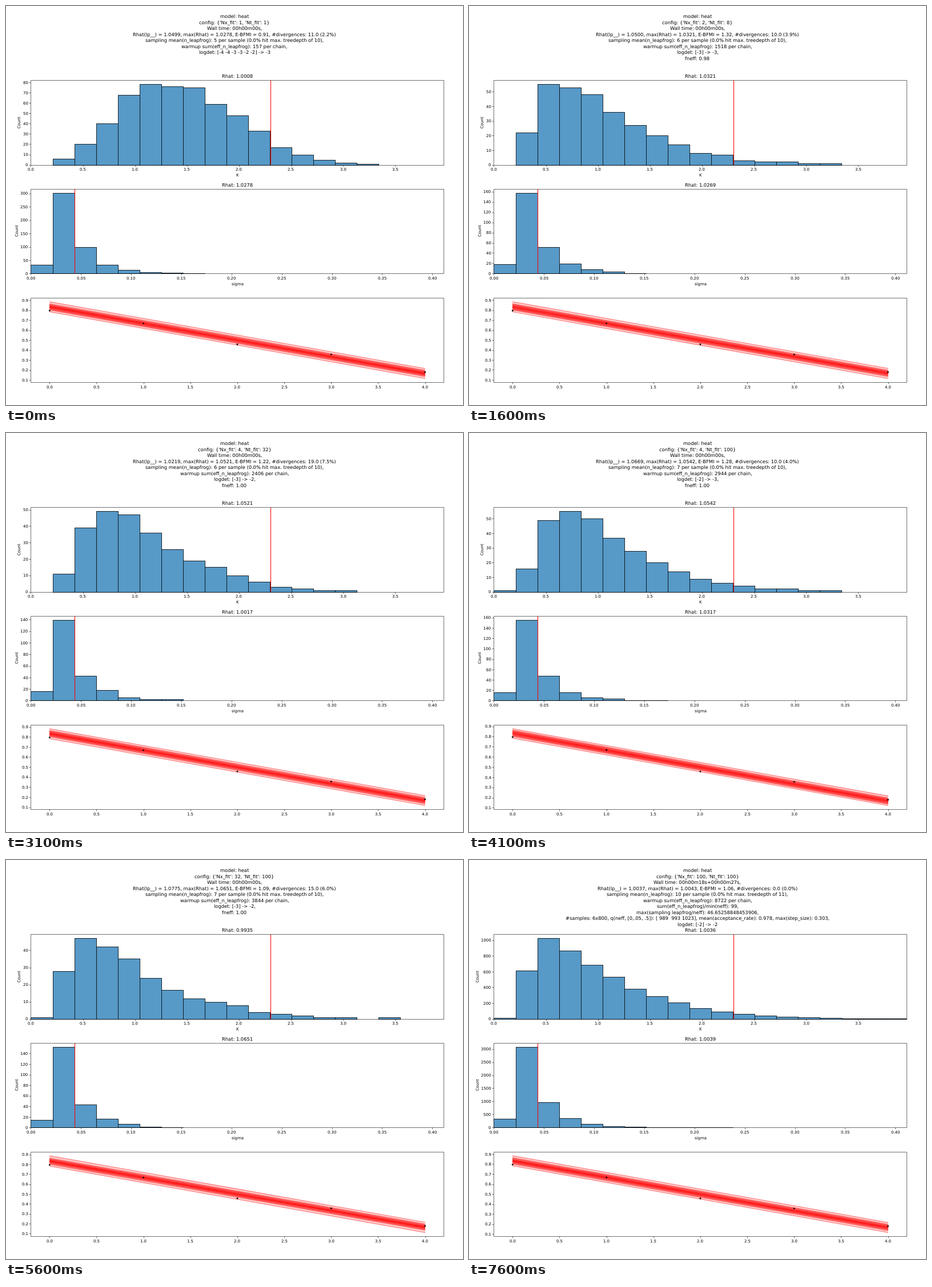
An HTML page with a canvas for the animation above (8.1 s loop, 800 px wide and 700 px high).

```html
<!DOCTYPE html>
<html lang="en">
<head>
<meta charset="utf-8">
<title>Heat model fit</title>
<style>
html, body { margin: 0; width: 100%; height: 100%; overflow: hidden; background: #fff; }
canvas { display: block; width: 800px; height: 700px; }
</style>
</head>
<body>
<canvas id="stage" width="800" height="700"></canvas>
<script>
const ctx = document.getElementById('stage').getContext('2d');
const LOOP = 8100, FIRST = 100, STEP = 500, LAST = 16;
const LEFT = 43.45, RIGHT = 766.4, HEIGHT = 148.2, CENTER = 405;
const BINS = 19, BIN_W = (RIGHT - LEFT) / BINS;
const SMALL = 6.944, LARGE = 8.333;
const SPINE = .56, EDGE = .69, CURVE = 1.04;

// Key runs; the runs between them are interpolated.
// mode: bin where K peaks, spread: half width of the fan
const KEYS = [
  { at: 0, lp: 1.0499, bfmi: .91, div: 11, warm: 157, rhatK: 1.0008, rhatS: 1.0278, mode: 6, peakK: 78, peakS: 301, spread: .0515, logdet: '[-4 -4 -3 -3 -2 -2] -> -3' },
  { at: 4, lp: 1.05, bfmi: 1.32, div: 10, warm: 1518, rhatK: 1.0321, rhatS: 1.0269, mode: 2.4, peakK: 55, peakS: 157, spread: .052, logdet: '[-3] -> -3' },
  { at: 7, lp: 1.0219, bfmi: 1.22, div: 19, warm: 2406, rhatK: 1.0521, rhatS: 1.0017, mode: 3, peakK: 49, peakS: 139, spread: .049, logdet: '[-3] -> -2' },
  { at: 9, lp: 1.0669, bfmi: 1.28, div: 10, warm: 2944, rhatK: 1.0542, rhatS: 1.0317, mode: 2.8, peakK: 55, peakS: 155, spread: .044, logdet: '[-2] -> -3' },
  { at: 11, lp: 1.0192, bfmi: 1.18, div: 16, warm: 3571, rhatK: .9892, rhatS: 1.0161, mode: 1.8, peakK: 47, peakS: 151, spread: .0575, logdet: '[-3] -> -2' },
  { at: 14, lp: 1.194, bfmi: .91, div: 14, warm: 4389, rhatK: 1.0021, rhatS: 1.1632, mode: 2.2, peakK: 46, peakS: 153, spread: .049, logdet: '[-3] -> -2' },
  { at: 16, lp: 1.0037, bfmi: 1.06, div: 0, warm: 8722, rhatK: 1.0036, rhatS: 1.0039, mode: 1.9, peakK: 1024, peakS: 3070, spread: .051, logdet: '[-2] -> -2' }
];
const POINTS = [.795, .667, .456, .355, .178];

const mix = (a, b, f) => a + (b - a) * f;
const snap = v => Math.floor(v + .5) + .5;

function seeded(seed) {
  return () => (seed = (seed * 16807) % 2147483647) / 2147483647;
}

function runAt(i) {
  const next = KEYS.find(k => k.at >= i);
  if (next.at === i) return next;
  const prev = KEYS[KEYS.indexOf(next) - 1];
  const f = (i - prev.at) / (next.at - prev.at);
  const run = { logdet: next.logdet };
  for (const key in prev) {
    if (key !== 'logdet') run[key] = mix(prev[key], next[key], f);
  }
  return run;
}

// Steep rise to the mode, slower fall that turns bell-shaped for a high mode
function shapeK(bin, mode) {
  const d = bin - mode;
  return d < 0
    ? Math.exp(-((-d / (.6 * mode)) ** 3))
    : Math.exp(-((d / 4.2) ** (1 + mode / 6)));
}

function shapeS(bin) {
  return bin ? Math.exp(-1.15 * (bin - 1) ** .9) : .11;
}

function sample(shape, peak, rand) {
  const raw = Array.from({ length: BINS }, (_, bin) => {
    const mean = peak * shape(bin);
    return Math.max(0, mean + (rand() - .5) * Math.sqrt(mean));
  });
  const scale = Math.round(peak) / Math.max(...raw);
  return raw.map(v => Math.round(v * scale));
}

// The grid doubles in time and space until both reach 100
function gridSize(i) {
  const nx = i < 10 ? Math.floor((i + 2) / 4) : i - 7;
  return [nx, i - Math.min(nx, 2)].map(n => Math.min(100, 2 ** n));
}

function headerLines(i, run) {
  const [nx, nt] = gridSize(i);
  const draws = 400 * (i - 14), long = draws > 0;
  const wall = long ? `18s+00h00m${i === LAST ? 27 : 13}s` : i === 14 ? '02s' : '00s';
  const samples = 6 * (long ? draws : i === 0 ? 84 : i < 5 ? 43 : 42);
  const div = Math.round(run.div);
  const leap = long ? 10 : Math.min(7, 5 + Math.ceil(i / 8));
  // Long runs track one more parameter
  const maxRhat = Math.max(run.rhatK, run.rhatS) + (long ? .0004 : 0);
  const lines = [
    'model: heat',
    `config: {'Nx_fit': ${nx}, 'Nt_fit': ${nt}}`,
    `Wall time: 00h00m${wall},`,
    `Rhat(lp__) = ${run.lp.toFixed(4)}, max(Rhat) = ${maxRhat.toFixed(4)}, E-BFMI = ${run.bfmi.toFixed(2)}, #divergences: ${div.toFixed(1)} (${(100 * div / samples).toFixed(1)}%)`,
    `sampling mean(n_leapfrog): ${leap} per sample (0.0% hit max. treedepth of ${long ? 11 : 10}),`,
    `warmup sum(eff_n_leapfrog): ${Math.round(run.warm)} per chain,`
  ];
  if (long) {
    const neff = [989, 993, 1023].map(n => Math.round(n * draws / 800));
    lines.push(
      'sum(eff_n_leapfrog)/min(neff): 99,',
      'max(sampling leapfrog/neff): 46.65258848453906,',
      `#samples: 6x${draws}, q(neff, [0,.05, .5]): [ ${neff[0]}  ${neff[1]} ${neff[2]}], mean(acceptance_rate): 0.978, max(step_size): 0.303,`);
  }
  const fneff = i > 0 && !long;
  lines.push(`logdet: ${run.logdet}${fneff ? ',' : ''}`);
  if (fneff) lines.push(`fneff: ${i < 6 ? '0.98' : '1.00'}`);
  return lines;
}

// Glyph runs start on whole pixels; anchor .5 centres, 1 aligns right
function text(str, x, y, size = SMALL, anchor = .5) {
  ctx.font = `${size}px "DejaVu Sans", sans-serif`;
  ctx.fillStyle = '#000';
  ctx.fillText(str, Math.round(x - anchor * ctx.measureText(str).width), Math.round(y));
}

function stroke(color, width, pts) {
  ctx.beginPath();
  pts.forEach(([x, y]) => ctx.lineTo(x, y));
  ctx.strokeStyle = color;
  ctx.lineWidth = width;
  ctx.stroke();
}

function box(x0, y0, x1, y1, width) {
  ctx.beginPath();
  ctx.rect(snap(x0), snap(y0), snap(x1) - snap(x0), snap(y1) - snap(y0));
  ctx.strokeStyle = '#000';
  ctx.lineWidth = width;
  ctx.stroke();
}

function xTick(x, base, label) {
  const y = snap(base);
  stroke('#000', SPINE, [[snap(x), y], [snap(x), y + 2.9]]);
  text(label, x, base + 10.4);
}

function yTick(y, label) {
  const x = snap(LEFT);
  stroke('#000', SPINE, [[x, snap(y)], [x - 2.9, snap(y)]]);
  text(label, 38.6, y + 2.7, SMALL, 1);
}

function tickStep(range) {
  const raw = range / 9, mag = 10 ** Math.floor(Math.log10(raw));
  return mag * [1, 2, 2.5, 5, 10].find(m => m * mag >= raw);
}

function histogram(top, counts, { name, rhat, perUnit, step, digits, truth }) {
  const base = top + HEIGHT, range = Math.max(...counts) * 1.05;
  const yOf = v => base - HEIGHT * v / range;

  ctx.save();
  ctx.beginPath();
  ctx.rect(LEFT, top, RIGHT - LEFT, snap(base) + .5 - top);
  ctx.clip();
  counts.forEach((n, i) => {
    if (!n) return;
    ctx.fillStyle = '#5799c7';
    box(LEFT + i * BIN_W, yOf(n), LEFT + (i + 1) * BIN_W, base, EDGE);
    ctx.fill();
    ctx.stroke();
  });
  const x = snap(LEFT + truth * perUnit);
  stroke('#f00', CURVE, [[x, top], [x, base]]);
  ctx.restore();

  box(LEFT, top, RIGHT, base, SPINE);
  for (let n = 0; LEFT + n * step * perUnit < RIGHT; n++) {
    xTick(LEFT + n * step * perUnit, base, (n * step).toFixed(digits));
  }
  const gap = tickStep(range);
  let chars = 1;
  for (let v = 0; v <= range; v += gap) {
    yTick(yOf(v), String(v));
    chars = String(v).length;
  }
  text(name, CENTER, base + 20.4);
  text('Rhat: ' + rhat.toFixed(4), CENTER, top - 4.2, LARGE);

  ctx.save();
  ctx.translate(Math.round(34.3 - 4.415 * chars), Math.round(top + HEIGHT / 2));
  ctx.rotate(-Math.PI / 2);
  text('Count', 0, 0);
  ctx.restore();
}

function fan(top, spread) {
  const middle = i => .8325 - .1667 * i;
  const max = middle(0) + spread, min = middle(4) - spread, pad = HEIGHT / 22;
  const xOf = v => 76.31 + 164.31 * v;
  const yOf = v => top + pad + (max - v) / (max - min) * (HEIGHT - 2 * pad);
  const path = offset => POINTS.map((_, i) => [xOf(i), yOf(middle(i) + offset(i))]);

  const bands = [[
    path(i => mix(spread, .05, i / 4)),
    path(i => -mix(.05, spread, i / 4))
  ]];
  for (let k = 5; k > 0; k--) {
    const half = .031 * (k / 5) ** 1.25;
    bands.push([path(() => half), path(() => -half)]);
  }

  ctx.save();
  ctx.lineCap = 'square';
  ctx.lineJoin = 'round';
  ctx.fillStyle = 'rgba(255,0,0,.21)';
  bands.forEach(([upper, lower]) => {
    ctx.beginPath();
    [...upper, ...lower.slice().reverse()].forEach(([x, y]) => ctx.lineTo(x, y));
    ctx.fill();
  });
  [...bands.flat(), path(() => 0)].forEach(p => stroke('rgba(255,0,0,.5)', CURVE, p));
  ctx.restore();

  ctx.fillStyle = '#000';
  POINTS.forEach((v, i) => {
    ctx.beginPath();
    ctx.arc(xOf(i), yOf(v), 1.4, 0, 2 * Math.PI);
    ctx.fill();
  });

  box(LEFT, top, RIGHT, top + HEIGHT, SPINE);
  for (let v = 0; v <= 4; v += .5) xTick(xOf(v), top + HEIGHT, v.toFixed(1));
  for (let n = 1; n <= 9; n++) yTick(yOf(n / 10), (n / 10).toFixed(1));
}

function draw(i) {
  const run = runAt(i), rand = seeded(7919 * (i + 1));
  const k = sample(bin => shapeK(bin, run.mode), run.peakK, rand);
  const s = sample(shapeS, run.peakS, rand);

  ctx.fillStyle = '#fff';
  ctx.fillRect(0, 0, 800, 700);
  headerLines(i, run).forEach((line, n) => text(line, 400, 21 + 10.53 * n, LARGE));
  histogram(130.4, k, { name: 'K', rhat: run.rhatK, perUnit: 182.2, step: .5, digits: 1, truth: 2.3 });
  histogram(321.25, s, { name: 'sigma', rhat: run.rhatS, perUnit: 1757, step: .05, digits: 2, truth: .0437 });
  fan(512.1, run.spread);
}

function tick() {
  const t = performance.now() % LOOP;
  draw(t < FIRST ? 0 : Math.min(LAST, 1 + Math.floor((t - FIRST) / STEP)));
  requestAnimationFrame(tick);
}

ctx.textRendering = 'geometricPrecision';
tick();
</script>
</body>
</html>
```
